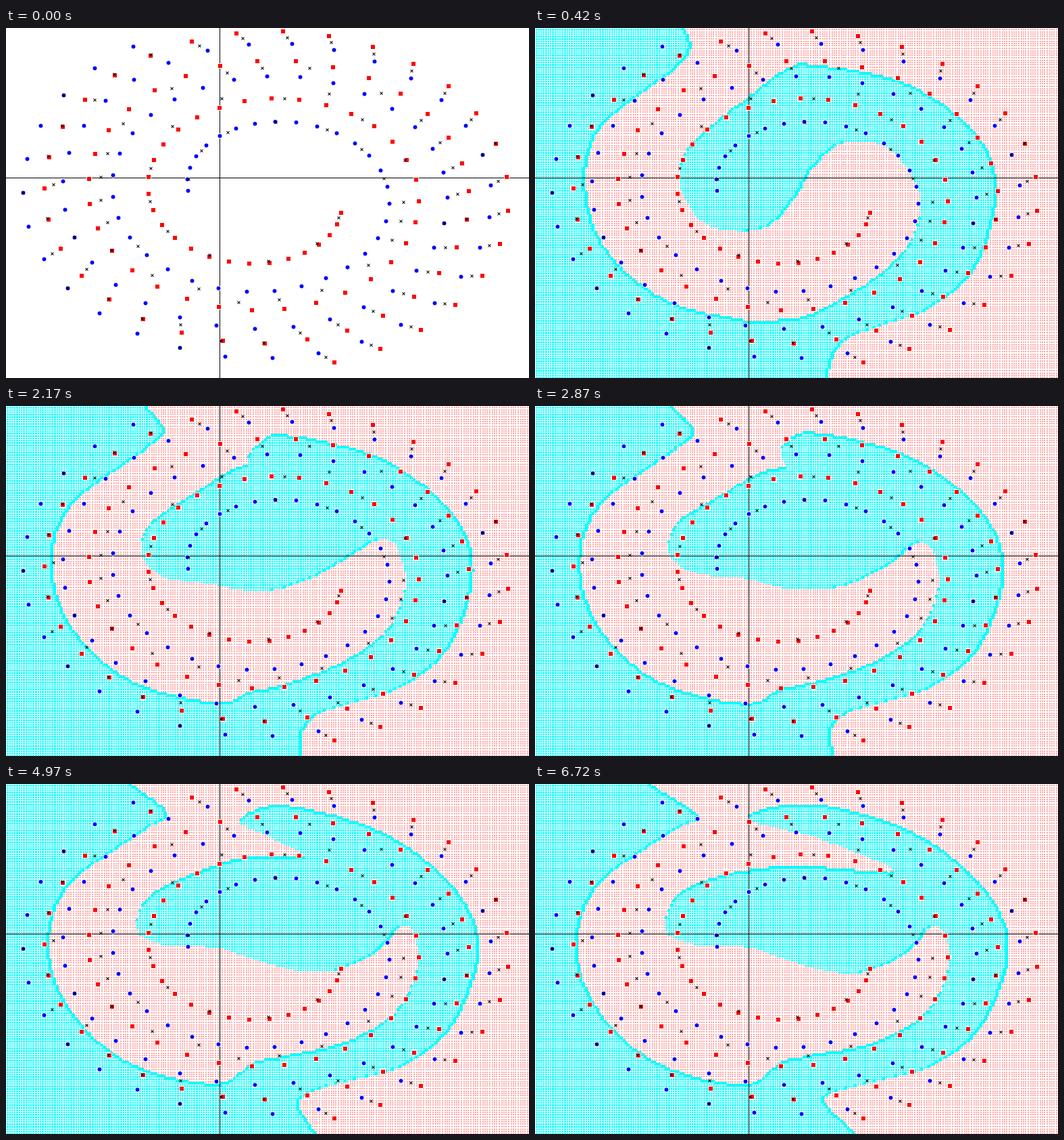
Write a matplotlib script that moves like this. It is 774 px wide and 517 px high and loops after 7070 ms.

```python
import numpy as np
import matplotlib.pyplot as plt
from matplotlib.animation import FuncAnimation
from matplotlib.path import Path

W, H, DPI = 774, 517, 100
PX = 72 / DPI
CENTRE, UNIT = np.array([385.3, 244.6]), np.array([35.19, 24.63])
CYAN, PINK = (0, 255, 255), (255, 165, 165)
PITCH = 3.5
STEPS = 20


def polar(angle, r):
    """Screen points for angles in radians, clockwise from the right."""
    return CENTRE + UNIT * np.column_stack([r * np.cos(angle), r * np.sin(angle)])


def spiral(phase):
    n = np.arange(100)
    return polar(np.pi + phase + 0.2 * n, np.sqrt(n + 10.9))


def kmeans(points, centres, rounds=10):
    for _ in range(rounds):
        dist = (((points[:, None] - centres) / UNIT) ** 2).sum(axis=-1)
        owner = dist.argmin(axis=1)
        centres = np.array([points[owner == k].mean(axis=0) for k in np.unique(owner)])
    return centres


blue, red = spiral(0.055), spiral(3.488)
merged = {34, 35, 39, 42, 47, 49, 51, 55, 56, 59}
red_seeds = [0, 3, 6, 9, 11, 13, 18, 20, 22, 24, 25, 28]
red_seeds += [i for i in range(30, 100) if i not in merged]
blue_seeds = [0, 1, 3, 5, 8, 10, 12, 14, 29, 33, 45, 48, 61, 77, 88, 91, 94, 97]
centres = kmeans(np.vstack([red, blue]), np.vstack([red[red_seeds], blue[blue_seeds]]))


def mix(a, b, u):
    a, b = np.asarray(a, float), np.asarray(b, float)
    return a + u * (b - a)


def smooth(pts, n=6):
    """Catmull-Rom curve through the points."""
    p = np.asarray(pts, float)
    p = np.vstack([2 * p[0] - p[1], p, 2 * p[-1] - p[-2]])
    t = np.linspace(0, 1, n, endpoint=False)[:, None]
    out = []
    for a, b, c, d in zip(p, p[1:], p[2:], p[3:]):
        out.append(b + t * ((c - a) + t * ((2 * a - 5 * b + 4 * c - d)
                                           + t * (3 * b - 3 * c + d - a))) / 2)
    return np.vstack(out + [p[-2:-1]])


def border(s):
    """Class border at training progress s: two elliptic shores, a lens and a notch."""
    fast, faster = 1 - (1 - s) ** 2, 1 - (1 - s) ** 3
    top = mix([(220, -2), (230, 30)], [(165, -2), (241, 48)], s)
    shore = polar(np.radians([235, 205, 180, 155, 130, 105, 95, 85, 60, 35, 10, -6]),
                  mix([9.0, 9.1, 8.8, 8.65, 8.42, 7.9, 7.6, 7.3, 6.15, 5.7, 5.35, 5.1],
                      [8.8, 9.15, 9.18, 9.06, 8.97, 8.4, 6.8, 6.4, 6.5, 6.68, 6.53, 6.39], fast))
    lens = mix([(535, 188), (500, 169), (450, 171), (412, 205), (385, 250), (345, 292),
                (290, 299), (240, 280), (212, 225), (225, 180), (270, 137)],
               [(598, 212), (582, 213), (550, 249), (490, 276), (435, 276), (385, 263),
                (310, 240), (230, 235), (193, 215), (207, 170), (260, 140)], faster)
    notch = mix([(325, 95), (340, 83), (352, 73), (380, 58)],
                [(380, 121), (534, 130), (420, 80), (313, 50)], s ** 2)
    rim = polar(np.radians([275, 305, 335, 360, 390, 410, 425, 435]),
                mix([7.76, 8.06, 8.4, 8.45, 8.75, 8.87, 8.68, 8.9],
                    [8.73, 8.57, 8.72, 8.98, 9.08, 9.03, 8.6, 8.6], fast))
    low = mix([(442, 482), (432, 519)], [(427, 468), (477, 519)], s ** 1.5)
    return np.vstack([top, shore, lens, notch, rim, low])


def left_of(curve):
    c = smooth(curve)
    return np.vstack([c, [(c[-1, 0], 530), (-9, 530), (-9, -9), (c[0, 0], -9)]])


def regions(step):
    if step > 1:
        return [left_of(border((step - 2) / (STEPS - 2)))]
    main = [(312, -2), (231, 90), (222, 140), (280, 191), (340, 200), (430, 176), (500, 168),
            (562, 215), (546, 320), (495, 405), (380, 463), (372, 519)]
    corner = [(725, -2), (776, 38), (776, -2)]
    low = np.vstack([smooth([(520, 519), (580, 486), (700, 483), (776, 479)]), [(776, 519)]])
    return [left_of(main), corner, low]


def cells(size):
    """Cell starts, and for each pixel its cell and its offset inside the cell."""
    start = np.round(np.arange(0, size, PITCH)).astype(int)
    pix = np.arange(size)
    cell = np.searchsorted(start, pix, "right") - 1
    return start, cell, pix - start[cell]


gx, col, off_x = cells(W)
gy, row, off_y = cells(H)
nodes = np.stack(np.meshgrid(gx + 1.5, gy + 1.5), axis=-1).reshape(-1, 2)


def texture(color, x_on, y_on):
    img = np.full((H, W, 3), 255, np.uint8)
    img[np.outer(y_on, x_on)] = color
    return img


cyan_tex = texture(CYAN, off_x > 0, off_y > 0)
pink_tex = texture(PINK, off_x % 3 > 0, off_y % 3 > 0)


def field(step):
    if step == 0:
        return np.full((H, W, 3), 255, np.uint8)
    inside = np.any([Path(p).contains_points(nodes) for p in regions(step)], axis=0)
    inside = inside.reshape(len(gy), len(gx))
    img = np.where(inside[np.ix_(row, col)][..., None], cyan_tex, pink_tex)
    # Squares with no later neighbour above or to the right stay uncovered.
    above = np.vstack([inside[:1], inside[:-1]])
    right = np.hstack([inside[:, 1:], inside[:, -1:]])
    r, c = np.nonzero(inside & ~(above & right))
    for dy in range(-1, 3):
        for dx in range(4):
            img[np.clip(gy[r] + dy, 0, H - 1), np.clip(gx[c] + dx, 0, W - 1)] = CYAN
    return img


fig = plt.figure(figsize=(W / DPI, H / DPI), dpi=DPI, facecolor="white")
ax = fig.add_axes([0, 0, 1, 1])
ax.axis("off")
fields = [field(s) for s in range(STEPS + 1)]
back = ax.imshow(fields[0], extent=(0, W, H, 0), interpolation="nearest", aspect="auto", zorder=0)
ax.set(xlim=(0, W), ylim=(H, 0))
ax.axhline(220.5, color="black", lw=PX, zorder=1)
ax.axvline(315.5, color="black", lw=PX, zorder=1)
dot = dict(ls="", ms=7 * PX, mec="white", mew=PX)
ax.plot(*blue.T, "o", color="blue", zorder=2, **dot)
ax.plot(*red.T, "s", color="red", zorder=3, **dot)
ax.plot(*centres.T, "x", color="black", ms=5 * PX, mew=PX, zorder=4)


def update(frame):
    back.set_data(fields[(frame + 4) // 5])
    return [back]


anim = FuncAnimation(fig, update, frames=1 + 5 * STEPS, interval=70, repeat=True, repeat_delay=0)
plt.show()
```
